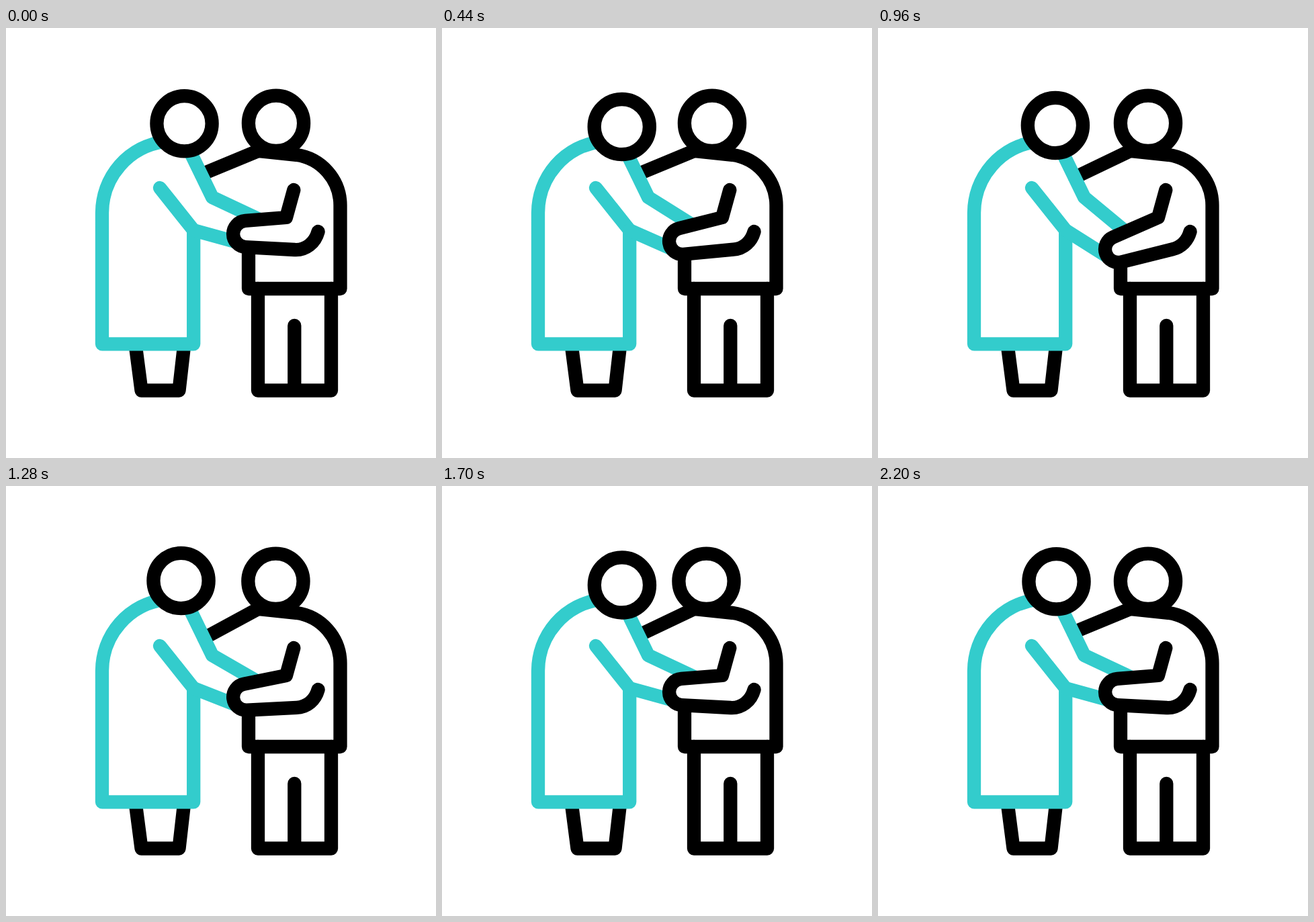
Write an HTML page that moves like this. It is 640 px wide and 640 px high and loops after 2.4 s.

```html
<!DOCTYPE html>
<html lang="en">
<head>
<meta charset="utf-8">
<title>Helping hands</title>
<style>
  html, body { margin: 0; width: 100%; height: 100%; overflow: hidden; background: #fff; }
  svg { display: block; width: 100%; height: 100%; }
  .line { fill: none; stroke: #000; stroke-width: 20.3; stroke-linecap: round; stroke-linejoin: round; }
  .teal { stroke: #33cccc; }
  .solid { fill: #fff; }
</style>
</head>
<body>
<svg viewBox="0 0 640 640">
  <path class="line" d="M375 388V539.5H484V388M429.3 443V539.5"/>
  <path class="line" id="torso"/>
  <path class="line" d="M193.5 478L201.5 539.5H257.5L264.5 478"/>
  <path class="line teal" d="M236 169A107 107 0 0 0 143 275V470.3H279.2V301L229 238"/>
  <path class="line teal" id="sleeve"/>
  <path class="line solid" id="hand"/>
  <circle class="line solid" id="leftHead" r="41.1"/>
  <circle class="line solid" id="rightHead" r="41.1" cy="141.8"/>
</svg>
<script>
const LOOP = 2400, STEP = 20;
const el = id => document.getElementById(id);
const mix = (a, b, k) => a + (b - a) * k;
const mixPoint = (p, q, k) => p.map((v, i) => mix(v, q[i], k).toFixed(2));

function ease(t, start, end) {
  const u = Math.min(1, Math.max(0, (t - start) / (end - start)));
  return u * u * (3 - 2 * u);
}

// Rises from 0 to 1 between a and b, returns to 0 between c and d.
const pulse = (t, a, b, c, d) => ease(t, a, b) - ease(t, c, d);

function polar(cx, cy, r, degrees) {
  const a = degrees * Math.PI / 180;
  return [cx + r * Math.cos(a), cy + r * Math.sin(a)].map(v => v.toFixed(2));
}

function drawHand(k) {
  const r = 19.6, cy = mix(306.5, 329.3, k);
  const top = polar(357.7, cy, r, mix(-94.6, -113.6, k));
  const bottom = polar(357.7, cy, r, mix(93.1, 75.5, k));
  const wrist = mixPoint([429.5, 330], [438, 329.4], k);
  const bend1 = mixPoint([446, 331], [452, 326], k);
  const bend2 = mixPoint([460, 320], [461, 316], k);
  el("hand").setAttribute("d",
    `M428.3 241L417 282L${top}A${r} ${r} 0 0 0 ${bottom}L${wrist}C${bend1} ${bend2} 464.6 303`);
  const upper = mixPoint([377.7, 285.2], [368.6, 303.1], k);
  const lower = mixPoint([341, 318], [341, 340], k);
  el("sleeve").setAttribute("d", `M272 180L307 252L${upper}M279.2 301L${lower}`);
}

function render(t) {
  drawHand(pulse(t, 200, 700, 960, 1480));

  const reach = mixPoint([290.8, 217.8], [295, 226.5], pulse(t, 700, 1200, 1200, 2200));
  el("torso").setAttribute("d",
    `M${reach}L375 183L432 188.8A76 76 0 0 1 497.5 264V388H361V330`);

  const nod = pulse(t, 200, 700, 1200, 2200);
  const lean = pulse(t, 700, 1150, 1200, 1700);
  el("leftHead").setAttribute("cx", 265.5 + 4.8 * nod - 10.4 * lean);
  el("leftHead").setAttribute("cy", 142.3 + 10.2 * nod - 12.2 * lean);
  el("rightHead").setAttribute("cx", 402 - 8.5 * pulse(t, 1200, 1700, 1700, 2200));
}

const origin = performance.now();
function tick() {
  const t = (performance.now() - origin) % LOOP;
  render(Math.floor(t / STEP) * STEP);
  requestAnimationFrame(tick);
}
render(0);
requestAnimationFrame(tick);
</script>
</body>
</html>
```
